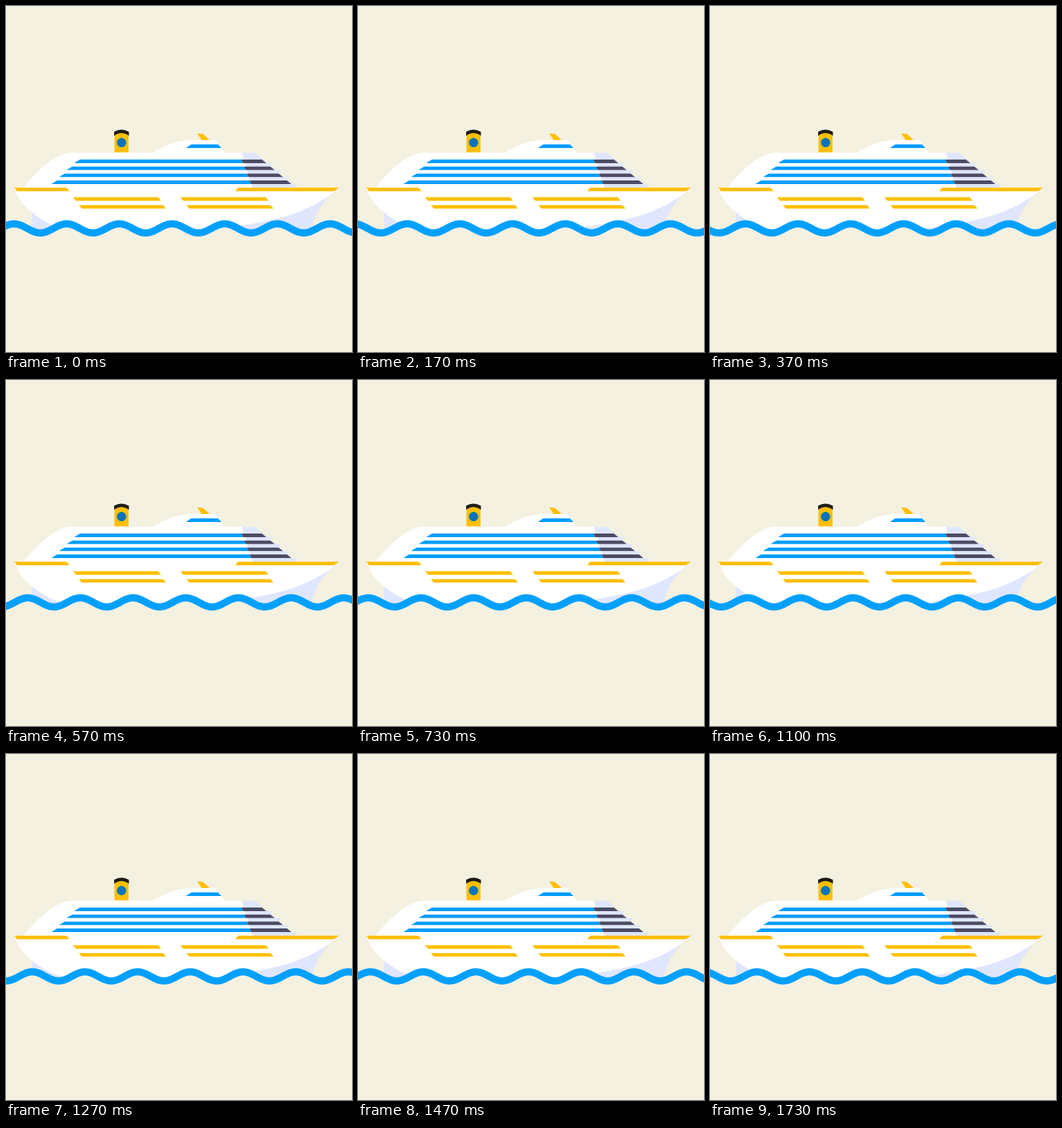
An HTML page for the animation above (1.76 s loop, 480 px wide and 480 px high).

```html
<!DOCTYPE html>
<html lang="en">
<head>
<meta charset="utf-8">
<title>Cruise ship</title>
<style>
  html, body { margin: 0; width: 100%; height: 100%; overflow: hidden; background: #f5f1e0; }
  svg { display: block; width: 100%; height: 100%; }
</style>
</head>
<body>
<svg viewBox="0 0 480 480">
  <rect width="480" height="480" fill="#f5f1e0"/>

  <!-- hull -->
  <path fill="#dfe6fd" d="M36 280V316H422Q427 296 432 286Q439 272 456 257L360 280Z"/>
  <path fill="#fff" d="M12 252H462L449 263Q425 279 400 288Q368 299 310 307L300 316H110L72 307Q50 299 36 286Q17 272 12 252Z"/>

  <!-- superstructure -->
  <path fill="#fff" d="M23 253C38 236 64 205 91 203.500H330L345 253Z"/>
  <path fill="#dfe6fd" d="M327 203.500H346L402 252H342Z"/>
  <path fill="#fff" d="M204 204Q226 188.500 252 185.700H290L304 204Z"/>
  <path fill="#ffbf00" d="M265.500 177Q272 176 276 180L282.500 186H271.500Z"/>
  <path fill="#009dff" d="M257 192H294L299 197H249.500Z"/>
  <g id="decks"></g>

  <!-- funnel -->
  <path fill="#ffbf00" d="M150.500 175H170V203H150.500Z"/>
  <path fill="#1d1d1b" d="M150 180V174.500Q160 168.700 170.500 174.500V180Q160 172.500 150 180Z"/>
  <circle cx="160.300" cy="189.500" r="6.500" fill="#0874b9"/>

  <g id="trim"></g>
  <path id="wave" fill="#f5f1e0" stroke="#00a0ff" stroke-width="10"/>
</svg>
<script>
const BLUE = "#009dff", DARK = "#4d4b63", PALE = "#dfe6fd", YELLOW = "#ffbf00";
const LOOP = 1760, FRAME = 100 / 3;
const WAVELENGTH = 73.1, STEP = 3.18, FIRST_CREST = 157.2;
const LEVEL = 308.5, HEIGHT = 6.3;

const get = id => document.getElementById(id);

function addPolygon(parent, points, fill) {
  const shape = document.createElementNS("http://www.w3.org/2000/svg", "polygon");
  shape.setAttribute("points", points.join(" "));
  shape.setAttribute("fill", fill);
  get(parent).append(shape);
}

// Band whose ends shift sideways from its top edge to its bottom edge
function addBand(parent, fill, y, left, right, leftShift, rightShift) {
  const low = y + 4.9;
  addPolygon(parent, [left, y, right, y, right + rightShift, low, left + leftShift, low], fill);
}

// Window rows widen downwards, each with a small ledge at the bow end
for (let row = 0; row < 4; row++) {
  const y = 213 + row * 9.7, left = 102.5 - row * 10.5;
  const split = 326.5 + row * 3.8, right = 355 + row * 11.6;
  addBand("decks", BLUE, y, left, split, -8, 2.3);
  addBand("decks", DARK, y, split, right, 2.3, 6);
  addPolygon("decks", [right + 6, y + 4.9, right + 15, y + 4.9, right + 11, y + 9.7], PALE);
}

addBand("trim", YELLOW, 252, 12, 84, 3, 4);
addBand("trim", YELLOW, 252, 322, 462, -4, -7);
for (const x of [93, 242]) {
  for (let row = 0; row < 2; row++) {
    addBand("trim", YELLOW, 265.3 + row * 10.9, x + row * 8.2, x + 118.3 + row * 6.8, 4, 3.8);
  }
}

function draw(time) {
  const step = Math.floor(((time % LOOP) + 3.34) / FRAME);
  const crest = FIRST_CREST - step * STEP;
  let d = "M-20 520";
  for (let x = -20; x <= 500; x += 2) {
    const y = LEVEL - HEIGHT * Math.cos((x - crest) * 2 * Math.PI / WAVELENGTH);
    d += `L${x} ${y.toFixed(2)}`;
  }
  get("wave").setAttribute("d", d + "V520Z");
}

const start = performance.now();
function tick() {
  draw(performance.now() - start);
  requestAnimationFrame(tick);
}
tick();
</script>
</body>
</html>
```
